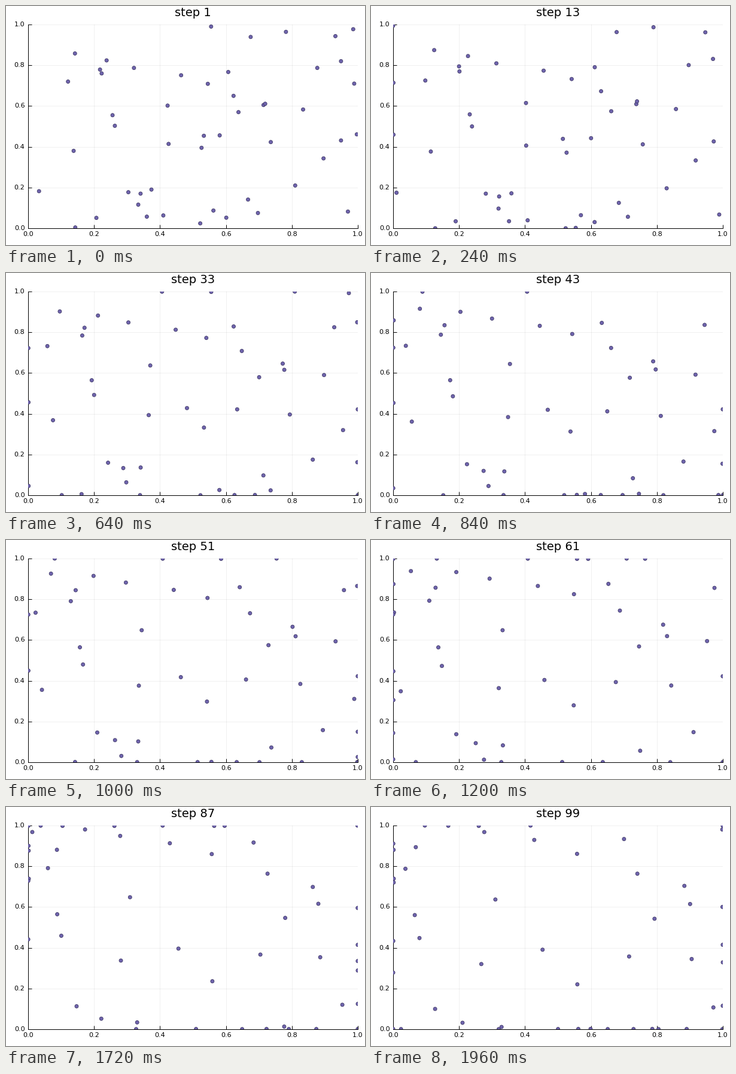
A matplotlib script for the animation above (2 s loop, 600 by 400 pixels).

```python
import numpy as np
import matplotlib.pyplot as plt
from matplotlib.animation import FuncAnimation

W, H, DPI = 600, 400, 100
LEFT, TOP, PLOT_W, PLOT_H = 37, 31, 551, 341
PX = 72 / DPI
FRAMES = 50
STRIDE = 2      # simulation steps per frame
SPEED = 0.002   # every dot moves this far per step
REACH = 1 / 3   # decay length of the repulsion

START = np.array([
    (.555, .990), (.675, .939), (.782, .964), (.932, .943), (.986, .977),
    (.142, .858), (.238, .824), (.218, .779), (.223, .760), (.121, .720),
    (.321, .787), (.464, .751), (.545, .709), (.607, .767), (.623, .650),
    (.638, .570), (.714, .605), (.719, .611), (.877, .787), (.949, .820),
    (.989, .710), (.834, .583), (.997, .461), (.949, .431), (.896, .343),
    (.736, .423), (.581, .456), (.533, .454), (.526, .395), (.423, .602),
    (.426, .414), (.256, .555), (.263, .503), (.138, .380), (.033, .182),
    (.304, .177), (.341, .170), (.374, .190), (.334, .116), (.360, .057),
    (.410, .063), (.207, .051), (.143, .004), (.522, .024), (.562, .087),
    (.601, .052), (.667, .141), (.697, .075), (.810, .210), (.970, .082),
])


def step(pos):
    """Move each dot a fixed length along its net repulsion; wrap at the edges."""
    gap = pos[:, None] - pos[None, :]
    dist = np.linalg.norm(gap, axis=2, keepdims=True) + 1e-9
    force = (gap / dist * np.exp(-dist / REACH)).sum(axis=1)
    heading = force / np.linalg.norm(force, axis=1, keepdims=True)
    return (pos + SPEED * heading) % 1


def simulate():
    states = [START]
    for _ in range(STRIDE * (FRAMES - 1)):
        states.append(step(states[-1]))
    return states[::STRIDE]


states = simulate()

plt.rcParams["font.family"] = "DejaVu Sans"
fig = plt.figure(figsize=(W / DPI, H / DPI), dpi=DPI, facecolor="white")
ax = fig.add_axes([LEFT / W, 1 - (TOP + PLOT_H) / H, PLOT_W / W, PLOT_H / H])
ticks = np.linspace(0, 1, 6)
ax.set(xlim=(0, 1), ylim=(0, 1), xticks=ticks, yticks=ticks)
ax.tick_params(direction="in", length=6 * PX, width=PX,
               labelbottom=False, labelleft=False)
ax.set_axisbelow(True)
ax.grid(color="black", alpha=0.06, linewidth=PX)
for side in ("top", "right"):
    ax.spines[side].set_visible(False)
for side in ("left", "bottom"):
    ax.spines[side].set_linewidth(PX)


def label(x, y, text, size, ha="center"):
    return fig.text(x / W, 1 - y / H, text, fontsize=size, ha=ha, va="baseline")


for t in ticks:
    label(LEFT + t * PLOT_W, 385, f"{t:.1f}", 8)
    label(31.5, TOP + (1 - t) * PLOT_H + 3, f"{t:.1f}", 8, "right")

title = label(LEFT + PLOT_W / 2, 17, "", 14)
# One width per dot keeps the markers at sub-pixel positions.
dots = ax.scatter(*START.T, s=(6 * PX) ** 2, color="#6f64ad",
                  edgecolors="#3b3562", linewidths=[0.8 * PX] * len(START),
                  zorder=3)


def update(i):
    dots.set_offsets(states[i])
    title.set_text(f"step {1 + STRIDE * i}")
    return dots, title


anim = FuncAnimation(fig, update, frames=FRAMES, interval=40,
                     repeat=True, repeat_delay=0, blit=False)
plt.show()
```
